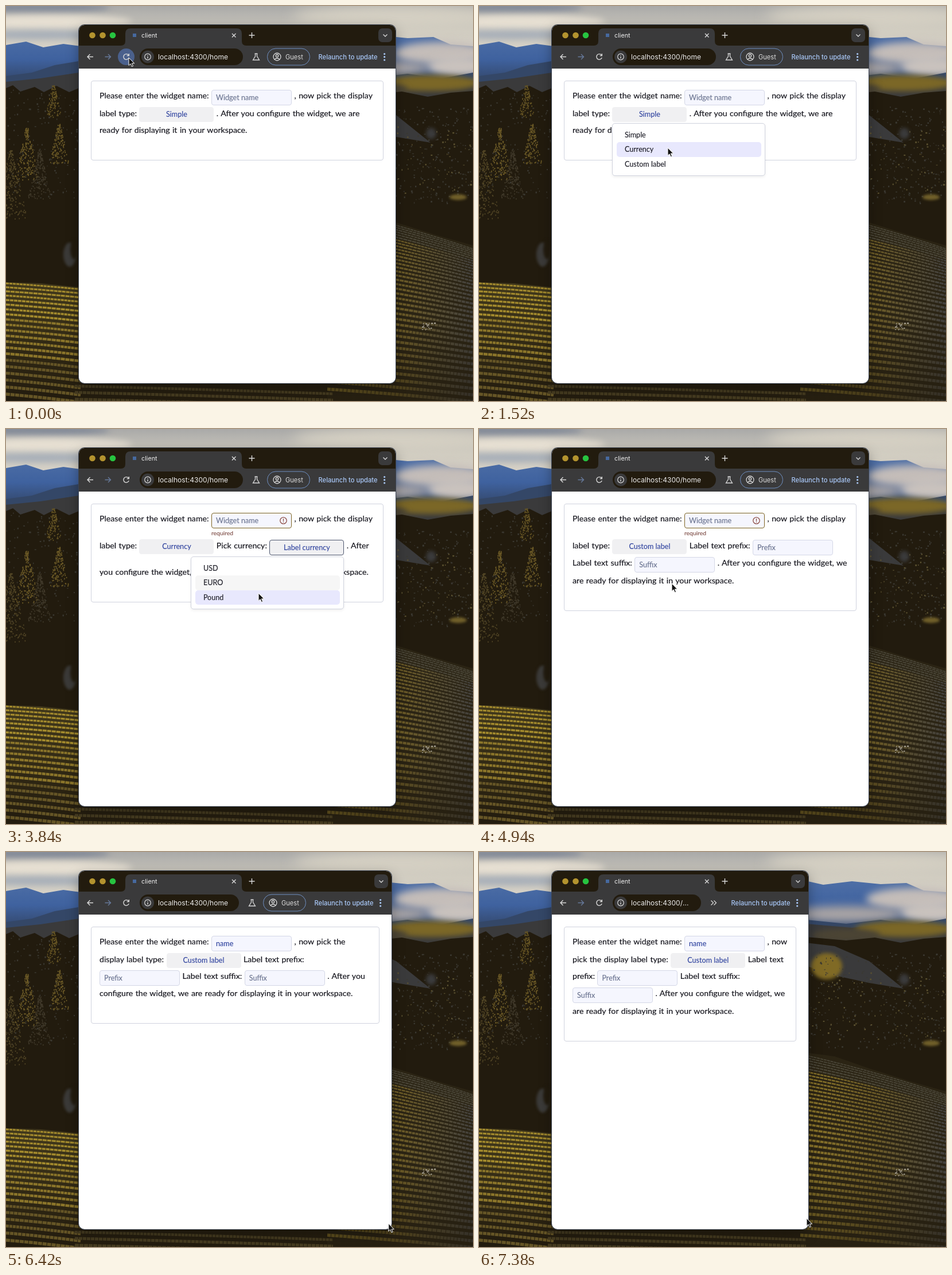
An HTML page with a canvas for the animation above (7.4 s loop, 814x688 px).

```html
<!DOCTYPE html>
<html lang="en">
<head>
<meta charset="utf-8">
<title>Widget form</title>
<style>
html, body { margin: 0; width: 100%; height: 100%; overflow: hidden; background: #221b0e; }
#stage { position: relative; width: 814px; height: 688px; overflow: hidden; font-family: Lato, sans-serif; }
#stage > *, #win > * { position: absolute; }
#photo { left: 0; top: 0; }
#win { left: 127px; top: 33px; height: 624px; border-radius: 10px; overflow: hidden; background: #fff;
  box-shadow: 0 0 0 1px #3c4452, 0 8px 22px rgba(0,0,0,.35); }
#strip { left: 0; top: 0; width: 100%; height: 36px; background: #221b0e; }
#bar { left: 0; top: 36px; width: 100%; height: 40px; background: #3a3a3b; }
#pill { left: 106px; top: 41px; height: 29px; border-radius: 15px; background: #221b0e; }
#url { left: 138px; top: 41px; line-height: 29px; overflow: hidden; text-overflow: ellipsis; white-space: nowrap;
  font-size: 12.1px; color: #ebebeb; }
#url, svg text { font-family: Inter, sans-serif; }
#win svg { top: 0; }
#left { left: 0; }
#right { right: 0; }
#box { left: 148px; top: 130px; box-sizing: border-box; border: 1px solid #d0d3de; border-radius: 4px;
  padding: 10px 14px 38px; font-size: 14.2px; line-height: 29px; word-spacing: .8px; color: #17171f;
  -webkit-text-stroke: .2px #17171f; }
.field { display: inline-block; overflow: hidden; height: 27px; margin-bottom: -1.5px; vertical-align: -10.5px;
  line-height: 1.2; word-spacing: 0; -webkit-text-stroke: .15px currentColor; }
.field b { display: block; box-sizing: border-box; height: 27px; border: 1px solid #d4d7e6; border-radius: 4px;
  font: 12.6px/25px Lato, sans-serif; color: #3346a0; }
.text b { position: relative; width: 140px; padding-left: 7px; background: #f5f6fe; }
.text b.hint { color: #6b7490; }
.text b.focus { border-color: #5566bb; }
.pick b { width: 130px; text-align: center; background: #f0f0f2; border-color: #f0f0f2; }
.type { height: 26px; vertical-align: -8.5px; }
.type b { height: 26px; line-height: 24px; }
.bad { height: 43px; vertical-align: -26.5px; }
.text.bad b { border-color: #7d6422; }
.pick.bad b { border-color: #4d566e; }
.bad small { display: block; font-size: 10.4px; line-height: 16px; color: #7e4d46; }
.field svg { position: absolute; right: 7px; top: 6px; }
#menu { box-sizing: border-box; width: 267px; height: 92px; padding: 6.5px; background: #fff;
  border: 1px solid #d0d3de; border-radius: 5px; box-shadow: 0 2px 5px rgba(0,0,0,.07); }
#menu div { height: 25.6px; line-height: 25.6px; padding-left: 14px; border-radius: 5px; font-size: 12.6px;
  color: #20202a; -webkit-text-stroke: .15px #20202a; }
#cursor { left: 0; top: 0; overflow: visible; }
</style>
</head>
<body>
<div id="stage">
  <canvas id="photo" width="814" height="688"></canvas>
  <div id="win">
    <div id="strip"></div><div id="bar"></div><div id="pill"></div>
    <svg id="left" width="320" height="76" viewBox="127 33 320 76" fill="none" stroke="#d8d8d8" stroke-width="1.4">
      <g stroke="none">
        <circle cx="150.5" cy="51" r="5.3" fill="#b3932e"/>
        <circle cx="168.5" cy="51" r="5.3" fill="#b3932e"/>
        <circle cx="186" cy="51" r="5.3" fill="#27c440"/>
        <path d="M200 69q8 0 8-8V48q0-9 9-9H402q9 0 9 9V61q0 8 8 8z" fill="#3a3a3b"/>
        <rect x="221" y="48" width="6" height="6" fill="#46699f"/>
        <text x="236" y="54.5" font-size="10.8" fill="#eee">client</text>
        <circle id="glow" cx="209.5" cy="88.5" r="14.5" fill="#4a608c"/>
        <circle cx="247" cy="88.5" r="11" fill="#3a3a3b"/>
      </g>
      <path d="M394 48l6.500 6.500m0-6.500l-6.500 6.500M428.500 46v10m-5-5h10"/>
      <path d="M152 88.500H142m4.500-4.500l-4.500 4.500 4.500 4.500"/>
      <path d="M172.500 88.500h10m-4.500-4.500l4.500 4.500-4.500 4.500" stroke="#66799b"/>
      <path d="M213.500 85.500a4.800 4.800 0 1 0 .7 4.500M214.300 83v3.600h-3.600"/>
      <circle cx="247" cy="88.500" r="5.300" stroke-width="1.2"/>
      <path d="M247 88v3.500m0-6v1.300"/>
    </svg>
    <div id="url">localhost:4300/home</div>
    <svg id="right" width="250" height="76" viewBox="429 33 250 76" fill="none" stroke="#d8d8d8" stroke-width="1.3">
      <rect x="649" y="39" width="24" height="24" rx="7" fill="#3a3a3b" stroke="none"/>
      <path d="M657.500 49.500l3.500 3.500 3.500-3.500"/>
      <g id="full">
        <path d="M433.500 83h5m-4 0v4.500l-4 6.500h11l-4-6.500V83"/>
        <rect x="455.500" y="74" width="74" height="29" rx="14.500" stroke="#6f8fc0" stroke-width="1"/>
        <circle cx="472.500" cy="88.500" r="6.500"/>
        <circle cx="472.500" cy="86.700" r="2.200"/>
        <path d="M468 93q4.500-4 9 0"/>
        <text x="487" y="92.500" font-size="11.1" fill="#dcdcdc" stroke="none">Guest</text>
      </g>
      <path id="less" d="M509.500 84.500l4 4-4 4m5-8l4 4-4 4"/>
      <g fill="#a9c8f8" stroke="none">
        <text x="544.500" y="92.700" font-size="11.2" font-weight="500">Relaunch to update</text>
        <circle cx="659.700" cy="83.500" r="1.600"/><circle cx="659.700" cy="88.700" r="1.600"/><circle cx="659.700" cy="94" r="1.600"/>
      </g>
    </svg>
  </div>
  <div id="box"></div>
  <div id="menu"></div>
  <svg id="cursor" width="12" height="18"><path d="M0 0V13.500L3.100 10.700 5.300 15.600 7.500 14.600 5.400 9.900H9.700Z" fill="#111" stroke="#fff"/></svg>
</div>
<script>
const $ = id => document.getElementById(id);
const LOOP = 7400;

// ---- landscape ----
const g = $('photo').getContext('2d');
let seed = 7;
const rnd = () => (seed = seed * 16807 % 2147483647) / 2147483647;

function fade(y0, y1, ...colors) {
  const f = g.createLinearGradient(0, y0, 0, y1);
  colors.forEach((c, i) => f.addColorStop(i / (colors.length - 1), c));
  return f;
}
// Fills everything below a ridge line, or a closed shape.
function land(fill, pts, closed) {
  g.beginPath();
  for (let i = 0; i < pts.length; i += 2) g.lineTo(pts[i], pts[i + 1]);
  if (!closed) { g.lineTo(814, 688); g.lineTo(0, 688); }
  g.fillStyle = fill;
  g.fill();
}
function blob(color, x, y, rx, ry, blur = 6) {
  g.filter = `blur(${blur}px)`;
  g.fillStyle = color;
  g.beginPath();
  g.ellipse(x, y, rx, ry, 0, 0, 7);
  g.fill();
  g.filter = 'none';
}
function specks(n, color, x, y, w, h) {
  g.fillStyle = color;
  for (let i = 0; i < n; i++) g.fillRect(x + rnd() * w, y + rnd() * h, 1 + rnd() * 2, 1 + rnd() * 2);
}
function tree(x, top, h, color) {
  for (let i = 0; i < h * 2; i++) {
    const d = rnd(), w = 2 + d * h * .22;
    g.fillStyle = color;
    g.fillRect(x + (rnd() - .5) * 2 * w, top + d * h, 1.6, 2.2);
  }
}
function rows(x0, x1, y0, n, gap, grow, slope, ink) {
  let y = y0;
  for (let i = 0; i < n; i++) {
    const k = slope(i / n);
    g.strokeStyle = ink(i / n);
    g.lineWidth = Math.max(1.2, (gap + grow * i) * .42);
    g.setLineDash([5 + i % 3, 1]);
    g.beginPath();
    g.moveTo(x0, y);
    g.quadraticCurveTo((x0 + x1) / 2, y + k * (x1 - x0) * .4, x1, y + k * (x1 - x0));
    g.stroke();
    y += gap + grow * i;
  }
  g.setLineDash([]);
}

function paint() {
  g.fillStyle = fade(0, 130, '#a9a9a8', '#cfcbc0', '#dcd6ca', '#b9bcc4');
  g.fillRect(0, 0, 814, 688);
  blob('#858c99', 50, 2, 130, 11);
  blob('#e6dfd2', 70, 28, 150, 13);
  blob('#a5adb8', 60, 50, 120, 8);
  blob('#d5d0c3', 690, 20, 190, 22, 12);
  land(fade(55, 130, '#4c6da5', '#3f629f', '#34486c'),
    [0, 68, 35, 62, 65, 72, 100, 66, 130, 70, 560, 48, 600, 57, 650, 51, 700, 56, 745, 54, 775, 67, 814, 70]);
  blob('#c4bdb9', 760, 82, 85, 20, 7);
  blob('#aaa5a5', 640, 108, 100, 14, 8);
  blob('#c9c2bd', 790, 105, 55, 18, 7);
  land('#344767', [0, 122, 45, 116, 85, 103, 127, 96, 570, 118, 640, 125, 700, 118, 760, 126, 814, 116]);
  land('#3a3a3b', [0, 132, 60, 126, 127, 116, 570, 125, 650, 132, 720, 125, 814, 130]);
  blob('#7b6727', 740, 134, 85, 14, 5);
  blob('#4b4434', 640, 145, 60, 12, 5);
  land('#221b0e', [0, 143, 12, 138, 25, 149, 50, 141, 66, 150, 88, 139, 110, 150, 127, 143,
    570, 148, 640, 154, 690, 149, 735, 158, 775, 151, 814, 148]);
  land('#3a3a3b', [570, 158, 620, 164, 680, 190, 740, 238, 680, 228, 620, 215, 570, 198], true);
  blob('#806a25', 606, 199, 27, 23, 3);
  specks(330, '#3b3932', 575, 175, 239, 170);
  specks(110, '#5b5130', 575, 200, 239, 130);
  specks(150, '#3b3932', 0, 145, 127, 190);
  tree(36, 212, 90, '#6d5b27');
  tree(92, 205, 70, '#6d5b27');
  tree(8, 250, 120, '#514525');
  tree(58, 250, 85, '#40392a');
  tree(82, 138, 55, '#665524');
  blob('#3a3a3b', 741, 222, 9, 10, 3);
  blob('#71602a', 788, 333, 15, 5, 2);
  blob('#3b3a38', 111, 433, 11, 21, 2);
  blob('#221b0e', 119, 424, 7, 17, 2);

  land('#2b2414', [560, 348, 620, 356, 680, 377, 750, 399, 814, 417]);
  const side = g.createLinearGradient(565, 0, 814, 0);
  side.addColorStop(0, '#8b7529');
  side.addColorStop(.5, '#6c5b27');
  side.addColorStop(1, '#42403d');
  rows(560, 814, 352, 38, 4.2, .24, p => .28 - p * .2, p => p < .15 ? '#4a4638' : side);
  g.globalAlpha = .5;
  land(fade(540, 688, 'rgba(34,27,14,0)', '#221b0e'), [560, 540, 814, 540]);
  g.globalAlpha = 1;
  specks(18, '#a8a294', 725, 551, 22, 14);

  land(fade(480, 688, '#42391c', '#221b0e'), [0, 481, 60, 483, 127, 490, 560, 560, 560, 688, 0, 688], true);
  rows(0, 130, 483, 21, 6.8, .3, p => .08 + p * .03, p => p < .35 ? '#a48b2d' : p < .7 ? '#8b752a' : '#655526');
  rows(120, 570, 662, 3, 11, 1, () => .03, () => '#453b20');
}

// ---- timeline ----
const path = [
  [0, 214, 90], [350, 214, 90], [900, 300, 188], [1080, 300, 188], [1500, 329, 247], [1720, 329, 248],
  [2000, 520, 190], [2080, 520, 190], [2360, 505, 157], [2660, 505, 158], [2900, 430, 160], [2980, 430, 160],
  [3250, 520, 206], [3350, 520, 206], [3850, 440, 286], [4020, 440, 289], [4380, 300, 205], [4480, 300, 205],
  [4760, 318, 290], [4880, 318, 290], [5120, 430, 160], [5550, 430, 160], [5960, 676, 591], [6160, 676, 652],
  [6300, 675, 650], [6680, 649, 641], [7380, 571, 638], [LOOP, 571, 638]
];
const edges = [[0, 679], [6280, 679], [6680, 660], [7380, 574], [LOOP, 574]];
const opens = [[1000, 1700, 'type'], [2050, 2400, 'money'], [3300, 4000, 'money'], [4450, 4850, 'type']];
const lists = { type: ['Simple', 'Currency', 'Custom label'], money: ['USD', 'EURO', 'Pound'] };

function at(table, t, i, soft) {
  const n = Math.max(1, table.findIndex(r => r[0] > t));
  const a = table[n - 1], b = table[n];
  let p = (t - a[0]) / (b[0] - a[0]);
  if (soft) p = p * p * (3 - 2 * p);
  return a[i] + (b[i] - a[i]) * p;
}
const between = (t, a, b) => t >= a && t < b;

const alertIcon = '<svg width="13" height="13" fill="none" stroke="#8b4a42" stroke-width="1.3">' +
  '<circle cx="6.500" cy="6.500" r="5.700"/><path d="M6.500 3.200v4.300m0 1v1.300"/></svg>';
const note = bad => bad ? '<small>required</small>' : '';

function input(hint, value = '', bad = false, focus = false) {
  return `<span class="field text ${bad ? 'bad' : ''}"><b class="${value ? '' : 'hint'} ${focus ? 'focus' : ''}">` +
    `${value || hint}${bad ? alertIcon : ''}</b>${note(bad)}</span>`;
}
function select(id, value, cls, bad) {
  return `<span class="field pick ${cls} ${bad ? 'bad' : ''}"><b id="${id}">${value}</b>${note(bad)}</span>`;
}
function form(t) {
  const kind = t < 1700 ? 0 : t < 4850 ? 1 : 2;
  const typed = 'name'.slice(0, Math.max(0, Math.floor((t - 5160) / 90)));
  const focus = between(t, 2950, 3300) || between(t, 5150, 5750);
  const extra = [
    '',
    'Pick currency: ' + select('money', t < 4000 ? 'Label currency' : 'Pound', '', between(t, 2400, 4000)),
    'Label text prefix: ' + input('Prefix') + ' Label text suffix: ' + input('Suffix')
  ][kind];
  return 'Please enter the widget name: ' + input('Widget name', typed, between(t, 3300, 5250), focus) +
    ' , now pick the display label type: ' + select('type', lists.type[kind], 'type') + ' ' + extra +
    ' . After you configure the widget, we are ready for displaying it in your workspace.';
}

function showMenu(t, right) {
  const open = opens.find(o => between(t, o[0], o[1]));
  const menu = $('menu');
  menu.style.display = open ? 'block' : 'none';
  if (!open) return;
  const r = $(open[2]).getBoundingClientRect();
  const left = r.left + 267 < right - 20 ? r.left : r.right - 267;
  const top = r.bottom + 2.5;
  menu.style.left = left + 'px';
  menu.style.top = top + 'px';
  const hit = time => Math.floor((at(path, time, 2, true) - top - 7.5) / 25.6);
  const now = hit(t), before = hit(t - 110);
  menu.innerHTML = lists[open[2]].map((s, i) =>
    `<div style="background:${i === now ? '#e8e8fd' : i === before ? '#f6f6f6' : '#fff'}">${s}</div>`).join('');
}

let shown = '';
function render(t) {
  const right = at(edges, t, 1);
  const tight = right < 640;
  const pillEnd = right - (tight ? 187 : 266);
  $('win').style.width = right - 127 + 'px';
  $('pill').style.width = pillEnd - 233 + 'px';
  $('url').style.width = pillEnd - 285 + 'px';
  $('url').style.minWidth = '0';
  if (!tight) $('url').style.width = pillEnd - 284 + 'px';
  $('full').style.display = tight ? 'none' : '';
  $('less').style.display = tight ? '' : 'none';
  $('box').style.width = right - 169 + 'px';

  const html = form(t);
  if (html !== shown) $('box').innerHTML = shown = html;
  showMenu(t, right);

  const x = at(path, t, 1, t < 6300), y = at(path, t, 2, t < 6300);
  $('cursor').style.transform = `translate(${x}px, ${y}px)`;
  $('glow').style.display = Math.hypot(x - 209.5, y - 88.5) < 14.5 ? '' : 'none';
}

paint();
const start = performance.now();
function tick() {
  render((performance.now() - start) % LOOP);
  requestAnimationFrame(tick);
}
tick();
</script>
</body>
</html>
```
